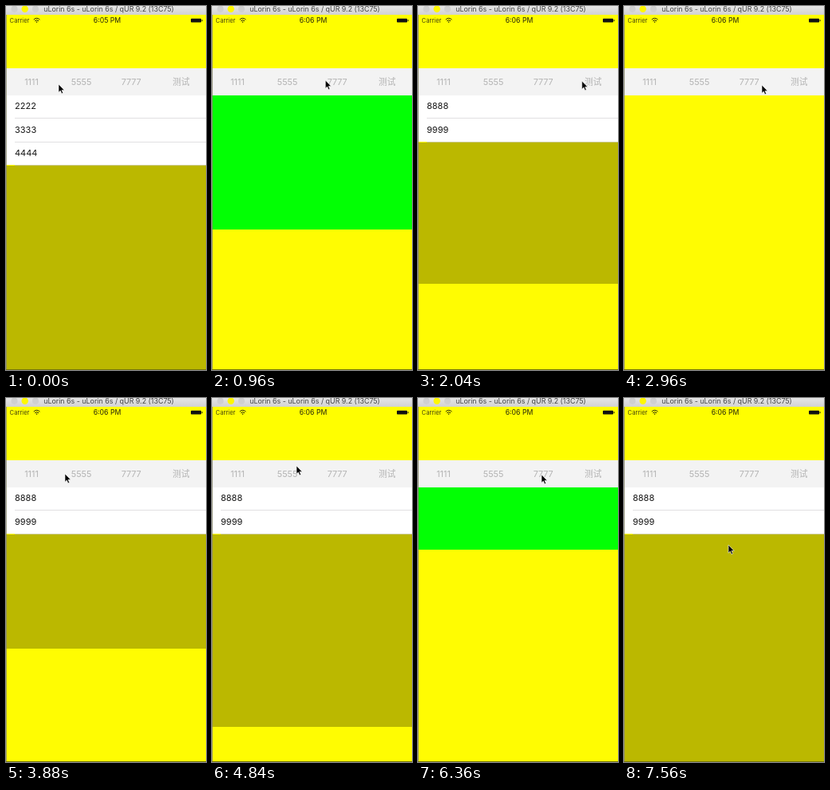
Animation, 251 px wide and 456 px high, one loop 7600 ms. Source, as an HTML page:

```html
<!DOCTYPE html>
<html lang="en">
<head>
<meta charset="utf-8">
<title>Drop-down menu</title>
<style>
  html, body { margin: 0; width: 100%; height: 100%; overflow: hidden; }
  svg { display: block; width: 251px; height: 456px; }
  text { font-family: Inter, Roboto, "Noto Sans CJK SC", "Noto Sans CJK", sans-serif; }
  .tab { font-size: 10.8px; fill: #b4b4b4; text-anchor: middle; }
  .row { font-size: 11px; fill: #151515; }
</style>
</head>
<body>
<svg viewBox="0 0 251 456">
  <defs>
    <linearGradient id="bar" x2="0" y2="1">
      <stop offset="0" stop-color="#e6e6e6"/>
      <stop offset="1" stop-color="#d2d2d2"/>
    </linearGradient>
    <clipPath id="reveal"><rect id="window" y="111.5" width="251" height="344.5"/></clipPath>
  </defs>

  <rect width="251" height="456" fill="#fffc02"/>
  <rect width="251" height="78" fill="#fffe00"/>

  <rect width="251" height="11" fill="url(#bar)"/>
  <circle cx="10.5" cy="3.8" r="4.1" fill="#d0d0d0"/>
  <circle cx="23.7" cy="3.8" r="4.2" fill="#fff800"/>
  <circle cx="37" cy="3.8" r="4.1" fill="#d0d0d0"/>
  <text x="129" y="7.2" font-size="8.9" fill="#444" text-anchor="middle">uLorin 6s - uLorin 6s / qUR 9.2 (13C75)</text>

  <text x="4.6" y="20.8" font-size="7.6" fill="#45440c">Carrier</text>
  <g fill="none" stroke="#24240a" stroke-width="1">
    <path d="M34.8 17q3.8-3.4 7.6 0M36.2 18.7q2.4-2.1 4.8 0"/>
    <circle cx="38.6" cy="20.1" r=".4"/>
  </g>
  <text id="clock" x="127" y="21.2" font-size="8.7" fill="#24240a" text-anchor="middle"></text>
  <rect x="232" y="15.8" width="13" height="4.8" rx=".8" fill="#111"/>
  <rect x="245.6" y="17.2" width="1" height="2" fill="#111"/>

  <g id="panels" clip-path="url(#reveal)"></g>
  <rect y="78" width="251" height="34" fill="#f3f3f3"/>
  <g id="tabs"></g>
  <path d="M.5 11V456" stroke="#8d8d70" stroke-opacity=".75"/>
  <path d="M0 455.5H251" stroke="#77770a"/>

  <path id="cursor" d="M0 0V10.2L2.3 8.1L3.9 11.8L5.6 11L4 7.4H7.2Z"
        fill="#000" stroke="#fff" stroke-width=".6"/>
</svg>
<script>
const LOOP = 7600, TICK = 40, OPEN_MS = 400;
const TOP = 111.5, FULL = 344.5, ROW = 29.45;
const $ = id => document.getElementById(id);

function add(parent, tag, attrs, text = "") {
  const el = document.createElementNS("http://www.w3.org/2000/svg", tag);
  for (const key in attrs) el.setAttribute(key, attrs[key]);
  el.textContent = text;
  parent.append(el);
  return el;
}

["1111", "5555", "7777", "测试"].forEach((label, i) =>
  add($("tabs"), "text", { class: "tab", x: 32 + i * 62.6, y: 98.8 }, label));

function listPanel(labels) {
  const g = add($("panels"), "g", {});
  const end = Math.floor(TOP + labels.length * ROW);
  add(g, "rect", { y: TOP, width: 251, height: FULL, fill: "#bbb800" });
  add(g, "rect", { y: TOP, width: 251, height: end - TOP, fill: "#fff" });
  labels.forEach((label, i) => {
    const y = TOP + i * ROW;
    add(g, "text", { class: "row", x: 11, y: y + 17.9 }, label);
    add(g, "rect", { x: 11, y: Math.floor(y + ROW), width: 240, height: .7, fill: "#d4d3d6" });
  });
  add(g, "rect", { y: end, width: 11, height: 1, fill: "#fffe00" });
  return g;
}

const panels = {
  first: listPanel(["2222", "3333", "4444"]),
  second: listPanel(["8888", "9999"]),
  green: add($("panels"), "rect", { y: TOP, width: 251, height: FULL, fill: "#02ff04" })
};

// The pointer sweeps back and forth over the tabs; each tap unrolls a panel.
const taps = [
  [-OPEN_MS, "first"], [290, "second"], [763, "green"], [1796, "second"],
  [2960, "green"], [3660, "second"], [4090, "first"], [4540, "second"],
  [5080, "green"], [5640, "second"], [6228, "green"], [6820, "second"]
];

// Pointer stops: time, x, y
const stops = [
  [0, 66, 98], [290, 93, 96], [763, 142, 93], [1300, 143, 93],
  [1796, 204, 94], [2240, 207, 94], [2960, 173, 99], [3540, 104, 96],
  [3660, 104, 96], [4090, 46, 94], [4540, 98, 87], [4840, 106, 85],
  [5080, 146, 90], [5640, 207, 95], [6228, 157, 96], [6360, 155, 96],
  [6820, 103, 97], [7100, 100, 99], [7560, 131, 184]
];

// Cubic ease-in-out with control points (.42, 0) and (.58, 1)
function easeInOut(x) {
  let lo = 0, hi = 1;
  for (let i = 0; i < 20; i++) {
    const s = (lo + hi) / 2;
    if (1.26 * s - .78 * s * s + .52 * s ** 3 < x) lo = s; else hi = s;
  }
  return lo * lo * (3 - 2 * lo);
}

function pointerAt(t) {
  const next = stops.findIndex(s => s[0] > t);
  if (next < 0) return stops.at(-1).slice(1);
  const [t0, x0, y0] = stops[next - 1], [t1, x1, y1] = stops[next];
  const u = (t - t0) / (t1 - t0), k = u * u * (3 - 2 * u);
  return [x0 + (x1 - x0) * k, y0 + (y1 - y0) * k];
}

function draw(t) {
  const [start, shown] = taps.findLast(tap => tap[0] <= t);
  const progress = Math.min(1, (t - start) / OPEN_MS);
  $("window").setAttribute("height", progress < 1 ? Math.round(FULL * easeInOut(progress)) + .5 : FULL);
  for (const name in panels)
    panels[name].setAttribute("display", name === shown ? "inline" : "none");
  $("clock").textContent = t < 480 ? "6:05 PM" : "6:06 PM";
  $("cursor").setAttribute("transform", `translate(${pointerAt(t)})`);
}

const began = performance.now();
function frame() {
  const t = (performance.now() - began) % LOOP;
  draw(Math.floor(t / TICK) * TICK);
  requestAnimationFrame(frame);
}
frame();
</script>
</body>
</html>
```
